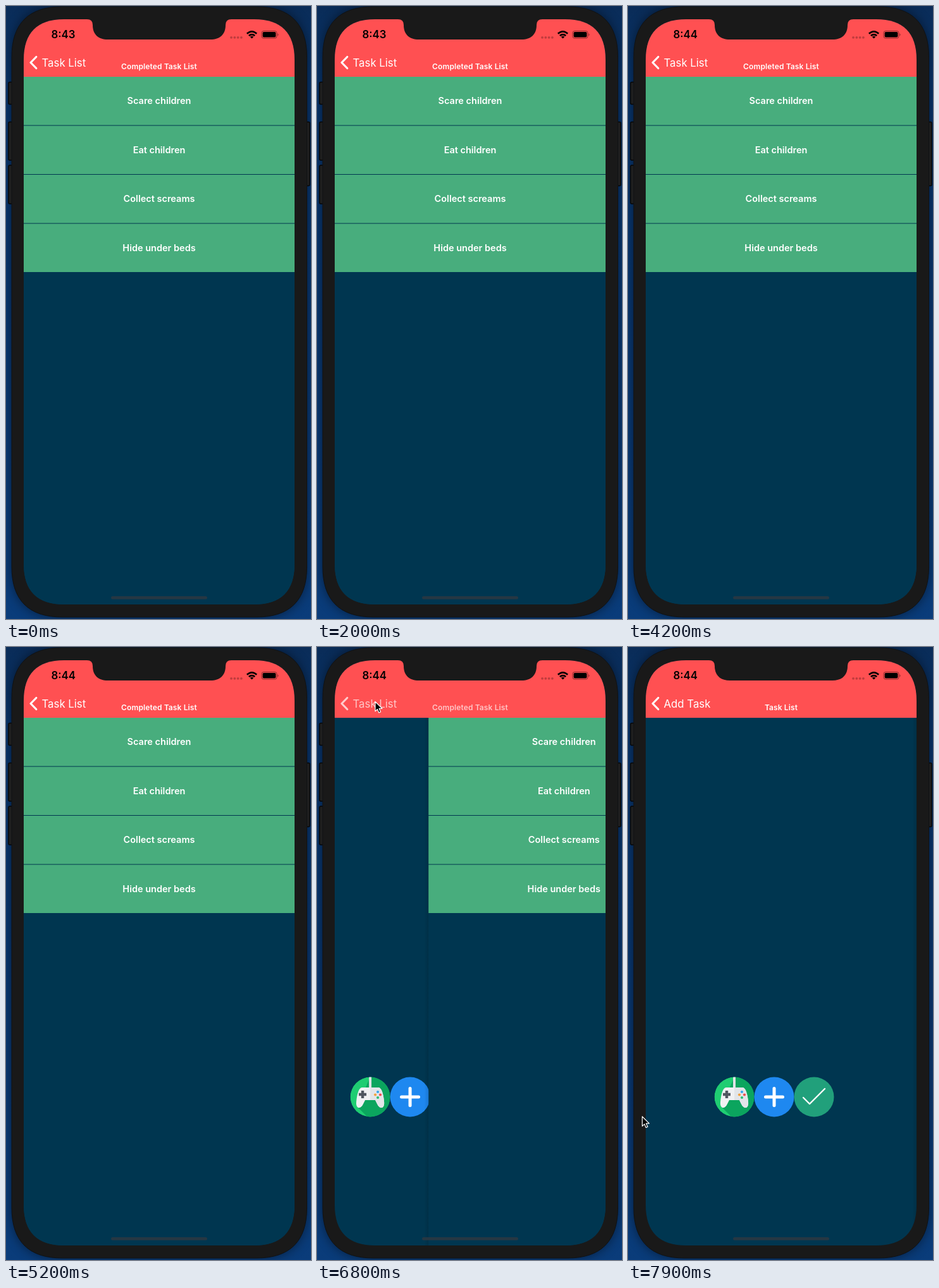
An HTML page for the animation above (8 s loop, 482x970 px).

```html
<!DOCTYPE html>
<html lang="en">
<head>
<meta charset="utf-8">
<title>Task list</title>
<style>
  html, body { margin: 0; width: 100%; height: 100%; overflow: hidden; background: #08346a; }
  svg { display: block; width: 482px; height: 970px; }
  text { font-family: Inter, Roboto, "Liberation Sans", sans-serif; fill: #fff; }
  .row { font-size: 14.5px; font-weight: 600; text-anchor: middle; }
  .title { font-size: 12px; font-weight: 600; letter-spacing: .12px; text-anchor: middle; }
  .back { font-size: 16.8px; }
  #clock { font-size: 16.8px; font-weight: 600; fill: #000; }
  .line { fill: none; stroke: #fff; stroke-linecap: round; stroke-linejoin: round; }
</style>
</head>
<body>
<svg viewBox="0 0 482 970">
  <defs>
    <linearGradient id="desk" x2="0" y2="1">
      <stop offset="0" stop-color="#0a2c58"/>
      <stop offset=".12" stop-color="#08346b"/>
      <stop offset="1" stop-color="#0a3c7a"/>
    </linearGradient>
    <linearGradient id="edge">
      <stop offset="0" stop-color="#000" stop-opacity="0"/>
      <stop offset="1" stop-color="#000" stop-opacity=".12"/>
    </linearGradient>
    <filter id="blur" x="-10%" y="-10%" width="120%" height="120%">
      <feGaussianBlur stdDeviation="9"/>
    </filter>
    <clipPath id="screenClip"><path id="screenShape"/></clipPath>
    <clipPath id="disc"><circle r="31.5"/></clipPath>
  </defs>

  <rect width="482" height="970" fill="url(#desk)"/>
  <path class="body" fill="#000" opacity=".5" filter="url(#blur)"/>
  <g fill="#1f1f1f" stroke="#070707" stroke-width="1.5">
    <rect x="4" y="120.5" width="9" height="35" rx="2"/>
    <rect x="4" y="183.5" width="9" height="60.5" rx="2"/>
    <rect x="4" y="252" width="9" height="61" rx="2"/>
    <rect x="471" y="183.5" width="9" height="101" rx="2"/>
  </g>
  <path class="body" fill="#191919" stroke="#101214"/>

  <g clip-path="url(#screenClip)">
    <rect x="28" y="21" width="428" height="926" fill="#003650"/>

    <g id="under">
      <g transform="translate(168 712)">
        <g clip-path="url(#disc)">
          <circle r="31.5" fill="#1fcd72"/>
          <path d="M0-32H32V32H-4L-20 16Z" fill="#0ba55e"/>
          <path d="M0-32V-14" stroke="#dfe3e6" stroke-width="4"/>
        </g>
        <path d="M-13-15H13C18-15 21-4 22 8C23 19 15 20 11 11L8 5H-8L-11 11C-15 20-23 19-22 8C-21-4-18-15-13-15Z" fill="#f0f1f3"/>
        <path d="M0-15H13C18-15 21-4 22 8C23 19 15 20 11 11L8 5H0Z" fill="#e2e5e9"/>
        <path d="M-18-4H-6M-12-10V2" stroke="#505660" stroke-width="4.4"/>
        <circle cx="12" cy="-8" r="2.1" fill="#35a5ee"/>
        <circle cx="8" cy="-3.5" r="2.1" fill="#f3a13a"/>
        <circle cx="16" cy="-3.5" r="2.1" fill="#ee4d4d"/>
        <circle cx="12" cy="1" r="2.1" fill="#2cbe76"/>
      </g>
      <g transform="translate(231 712)">
        <circle r="31.5" fill="#1e88f0"/>
        <path class="line" stroke-width="5" d="M-13.5 0H13.5M0-13.5V13.5"/>
      </g>
      <g transform="translate(294 712)">
        <circle r="31.5" fill="#21a07b"/>
        <path class="line" stroke-width="2.4" d="M-17 1L-7 11L17-13"/>
      </g>
    </g>

    <g id="over">
      <rect x="21" y="112" width="7" height="835" fill="url(#edge)"/>
      <rect x="28" y="112" width="428" height="835" fill="#003650"/>
      <g id="rows"></g>
    </g>

    <rect x="28" y="21" width="428" height="91" fill="#ff5052"/>
    <path id="chevron" class="line" stroke-width="3.2" d="M47.8 80.5L39 89.5L47.8 98.5"/>
    <g id="oldNav">
      <text class="back" x="56.5" y="95.7">Task List</text>
      <text class="title" x="242" y="100.3">Completed Task List</text>
    </g>
    <g id="newNav">
      <text class="back" x="56.5" y="95.7">Add Task</text>
      <text class="title" x="242" y="100.3">Task List</text>
    </g>

    <text id="clock" x="71.5" y="51.3">8:43</text>
    <g fill="#000" opacity=".25">
      <circle cx="356" cy="49.8" r="1.9"/><circle cx="361.3" cy="49.8" r="1.9"/>
      <circle cx="366.6" cy="49.8" r="1.9"/><circle cx="371.9" cy="49.8" r="1.9"/>
    </g>
    <g fill="none" stroke="#000" stroke-width="2.6">
      <path d="M380.8 43.8Q388.5 37 396.2 43.8"/>
      <path d="M383.8 47.1Q388.5 43 393.2 47.1"/>
      <path d="M388.5 51.6L385.7 48.8Q388.5 46.6 391.3 48.8Z" fill="#000" stroke="none"/>
    </g>
    <rect x="404" y="39.5" width="24" height="11.6" rx="3.2" fill="none" stroke="#000" opacity=".45"/>
    <rect x="405.6" y="41" width="20.8" height="8.6" rx="1.8"/>
    <path d="M429.4 43.2Q431.8 45.3 429.4 47.4Z" opacity=".45"/>
    <rect x="166" y="934" width="152" height="4.8" rx="2.4" fill="#263743"/>
  </g>
  <path fill="#191919" d="M128 20V21Q137 21 137 30C137 45 146 53 161 53H323C338 53 347 45 347 30Q347 21 356 21V20Z"/>

  <path id="cursor" d="M0 0V15.2L3.5 11.9L5.9 17.4L8.6 16.2L6.2 10.9H11Z" fill="#000" stroke="#fff" stroke-width="1.2" stroke-linejoin="round"/>
</svg>
<script>
const LOOP = 8000, STEP = 100, WIDTH = 428, POP = 6730;
const $ = id => document.getElementById(id);
const clamp = v => Math.max(0, Math.min(1, v));

// Rounded box with smooth corners reaching e along each side.
function smoothBox(x, y, w, h, e) {
  const k = e / 3, f = e - k;
  return `M${x} ${y + e}c0 ${-f} ${k} ${-e} ${e} ${-e}h${w - 2 * e}` +
    `c${f} 0 ${e} ${k} ${e} ${e}v${h - 2 * e}` +
    `c0 ${f} ${-k} ${e} ${-e} ${e}h${2 * e - w}` +
    `c${-f} 0 ${-e} ${-k} ${-e} ${-e}z`;
}
$('screenShape').setAttribute('d', smoothBox(28, 21, WIDTH, 926, 64));
for (const p of document.querySelectorAll('.body')) {
  p.setAttribute('d', smoothBox(9, 1, 466.5, 966, 80));
}

$('rows').innerHTML = ['Scare children', 'Eat children', 'Collect screams', 'Hide under beds']
  .map((label, i) => {
    const y = 112 + i * 77.5;
    return `<rect x="28" y="${y}" width="${WIDTH}" height="76.5" fill="#48ad7d"/>` +
      `<text class="row" x="242" y="${y + 43.3}">${label}</text>`;
  }).join('');

// Pointer path: time, x, y
const path = [
  [5500, 22, 743], [6000, 82, 92], [6200, 85.5, 84.5], [6500, 91, 86],
  [6800, 92, 86.5], [7200, 87, 84.5], [7400, 85, 92], [7800, 24, 735], [7900, 22.5, 743]
];

function pointerAt(t) {
  const i = path.findIndex(p => p[0] > t);
  if (i < 0) return path[path.length - 1].slice(1);
  const [t0, x0, y0] = path[i - 1], [t1, x1, y1] = path[i];
  const u = (t - t0) / (t1 - t0), s = u * u * (3 - 2 * u);
  return [x0 + (x1 - x0) * s, y0 + (y1 - y0) * s];
}

// Critically damped spring from 0 to 1.
function spring(ms) {
  const a = Math.max(0, ms) * 0.0175;
  return 1 - (1 + a) * Math.exp(-a);
}

const shift = (id, x, y = 0) => $(id).setAttribute('transform', `translate(${x.toFixed(2)} ${y.toFixed(2)})`);
const fade = (id, v) => $(id).setAttribute('opacity', v.toFixed(3));

function draw(t) {
  const p = spring(t - POP);
  shift('over', p * WIDTH);
  shift('under', -0.3 * WIDTH * (1 - p));
  fade('oldNav', clamp(1 - p * 0.95 - clamp((p - 0.4) * 2)));
  fade('newNav', clamp((p - 0.45) / 0.5));
  fade('chevron', 1 - 0.3 * clamp(p * 3) * clamp((1 - p) * 3));
  $('clock').textContent = t < 3000 ? '8:43' : '8:44';

  const shown = t >= path[0][0];
  fade('cursor', shown ? 1 : 0);
  if (shown) shift('cursor', ...pointerAt(t));
}

const start = performance.now();
function tick() {
  const t = (performance.now() - start) % LOOP;
  draw(Math.floor(t / STEP) * STEP);
  requestAnimationFrame(tick);
}
draw(0);
requestAnimationFrame(tick);
</script>
</body>
</html>
```
